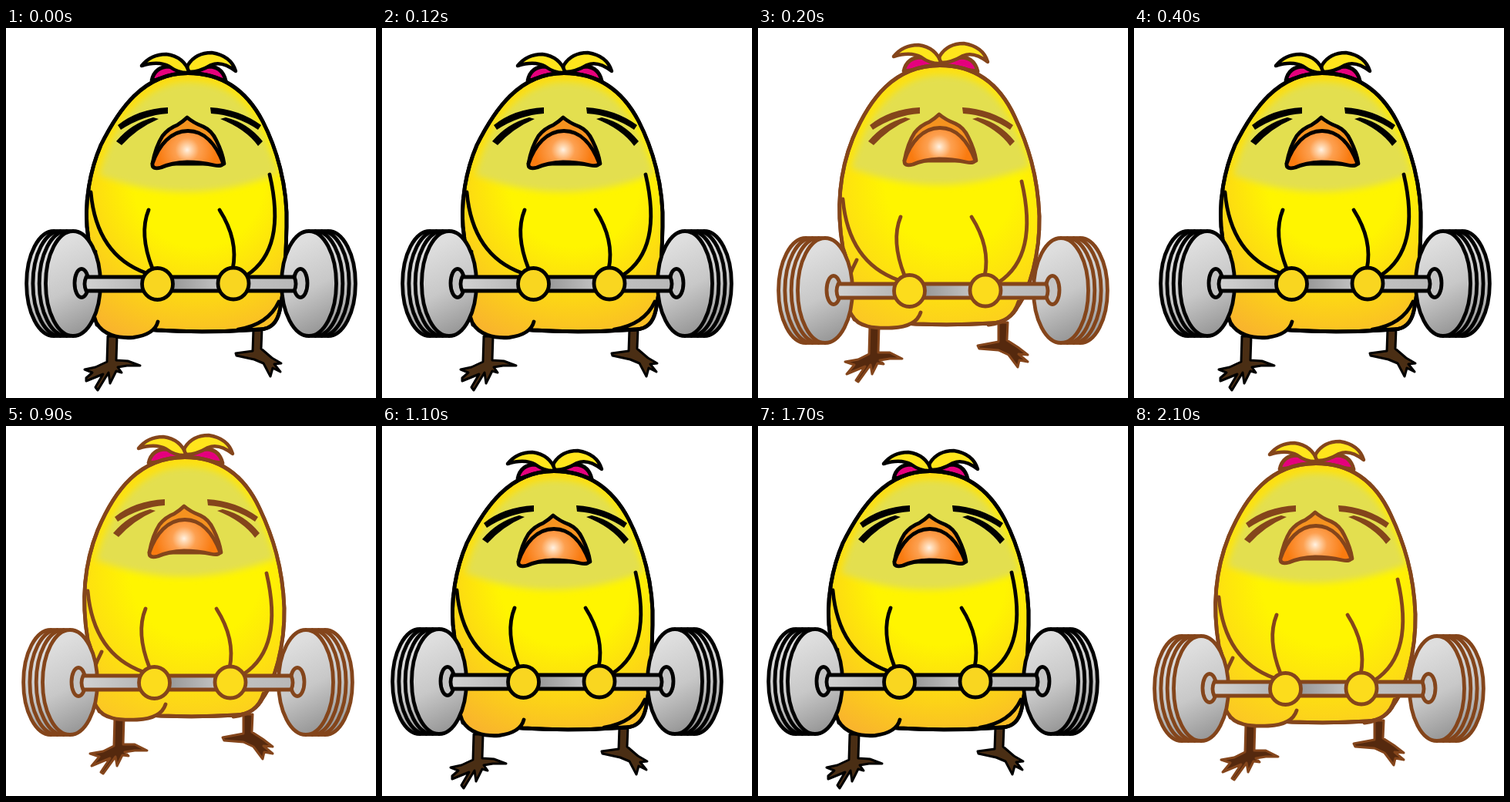
An HTML page for the animation above (2.3 s loop, 480 px wide and 480 px high).

```html
<!DOCTYPE html>
<html lang="en">
<head>
<meta charset="utf-8">
<title>Weightlifting chick</title>
<style>
html, body { margin: 0; width: 100%; height: 100%; overflow: hidden; background: #fff; }
svg { display: block; width: 100%; height: 100%; }
</style>
</head>
<body>
<svg id="stage" viewBox="0 0 480 480" stroke-linecap="round" stroke-linejoin="round"></svg>
<script>
const stage = document.getElementById('stage');

const poses = [
  { // body lowered, bar raised
    id: 'low', ink: '#000', edge: '#f9b52c', hand: '#f9d620', leg: '#4a2e14',
    barY: 0, hairY: 0, beakY: 0, shadeY: 0,
    body: 'M236 58.5C283 58.5 313 83 333 121C350 154 366 204 364 258C363 300 361 340 355 367Q350 390 330 391Q260 396 196 392L118 385Q118 320 107 274C99 226 111 180 123 152C146 106 178 58.5 236 58.5Z',
    lobe: 'M116 290Q106 355 117 382C126 398 145 403 165 401.5C183 399 194 393 197 381',
    thigh: 'M301 391Q340 385 354 355',
    feet: [
      'M132 400L144 400L143 431L158 432L174 438L157 438L145 440L150 447L143 445L135 461L133 447L119 470L116 466L126 449L104 458L104 454L112 447L102 443L116 440L131 433Z',
      'M321 390L332 390L331 416L345 428L357 435L348 436L356 446L346 441L343 452L334 435L322 430L299 425L298 422L320 419Z'
    ]
  },
  { // body stretched upwards, bar sinking
    id: 'high', ink: '#84451b', edge: '#fbc526', hand: '#fcdc1c', leg: '#55290e',
    barY: 9, hairY: -12, beakY: -4, shadeY: -9,
    body: 'M236 48.5C284 48.5 314 74 333 115C350 151 363 191 365 244C366 294 352 340 337 361Q327 381 303 383Q255 386 205 384L125 378Q123 320 110 285C100 226 109 178 123 143C145 91 177 48.5 236 48.5Z',
    lobe: 'M128 301Q104 347 122 373C130 388 151 390 174 389C195 388 207 382 211 369',
    thigh: 'M299 385Q330 382 338 355',
    feet: [
      'M145 386L157 386L156 421L171 421L187 429L171 429L158 431L163 436L155 435L148 449L146 437L130 459L127 457L139 439L115 449L125 437L113 433L130 430L144 423Z',
      'M312 382L324 382L323 405L337 414L350 424L338 423L350 433L339 431L337 440L325 424L312 418L287 416L285 412L312 407Z'
    ]
  }
];

const ellipse = (x, y, rx, ry, fill) =>
  `<ellipse cx="${x}" cy="${y}" rx="${rx}" ry="${ry}" fill="${fill}"/>`;

function weights(front, side) {
  const discs = [3, 2, 1, 0].map(i => ellipse(front + side * i * 8.3, 331.5, 35.5, 68, 'url(#steel)'));
  return discs.join('') + ellipse(front - side * 11, 331, 9, 18.5, '#c4c4c4');
}

function barbell({ barY, hand }) {
  return `<g transform="translate(0 ${barY})">
    ${weights(87, -1)}${weights(393, 1)}
    <path d="M104 323H374Q378 332 374 341H104Q100 332 104 323Z" fill="url(#bar)"/>
    <g fill="none">
      <path d="M110 213C115 268 140 303 182 318M185 236C176 258 179 284 190 312"/>
      <path d="M342 190C356 250 349 297 312 321M277 236C291 258 300 285 294 313"/>
    </g>
    ${ellipse(196.5, 332, 20, 20.5, hand)}${ellipse(295, 331.5, 20, 20.5, hand)}
  </g>`;
}

function hair({ hairY }) {
  return `<g transform="translate(0 ${hairY})">
    <g fill="#e5007d">
      <path d="M189 68Q193 50 212 50Q225 51 235 63Z"/>
      <path d="M238 63Q249 50 266 50Q281 52 285 68Z"/>
    </g>
    <g fill="#ffe51c" stroke-width="4.5">
      <path d="M176 49Q188 34 208 34Q231 37 238 58Q224 59 212 50Q198 42 176 49Z"/>
      <path d="M236 48Q246 32 267 32Q292 36 298 56Q280 42 266 48Q251 57 238 57Q234 52 236 48Z"/>
    </g>
  </g>`;
}

function face({ ink, beakY }) {
  return `<g fill="${ink}" stroke="none">
      <path d="M145 126Q171 105 210 103L210 111Q178 113 149 132Z"/>
      <path d="M143 147Q162 124 191 116L198 118Q170 130 150 152Z"/>
      <path d="M265 103L266 111Q299 113 327 132L331 126Q302 105 265 103Z"/>
      <path d="M278 118Q311 131 327 153L333 147Q314 123 285 116Z"/>
    </g>
    <g transform="translate(0 ${beakY})">
      <path d="M190 176Q194 154 203 140Q211 130 222 126Q230 121 235 116Q243 123 256 128Q267 133 273 146Q281 162 283 176Z" fill="#f5921f"/>
      <path d="M190 176C198 152 214 133.5 236 133.5C258 133.5 273 152 282 176Q279 180 270 178Q252 174 235 174Q214 175 201 181Q189 184 190 176Z" fill="url(#mouth)"/>
    </g>`;
}

function chick(pose) {
  const { id, ink, edge, leg, body, lobe, thigh, feet, shadeY } = pose;
  return `<g id="${id}" stroke="${ink}" stroke-width="4.8">
    <radialGradient id="skin-${id}" gradientUnits="userSpaceOnUse" cx="250" cy="200" r="222">
      <stop offset=".38" stop-color="#fff500"/><stop offset="1" stop-color="${edge}"/>
    </radialGradient>
    <clipPath id="clip-${id}"><path d="${body}"/></clipPath>
    <path d="${feet.join('')}" fill="${leg}" stroke-width="3"/>
    ${hair(pose)}
    <path d="${body}" fill="url(#skin-${id})"/>
    <g clip-path="url(#clip-${id})">
      <path d="M236 70C186 70 152 114 137 146Q126 170 121 191Q236 235 353 189Q345 160 325 123C304 87 280 70 236 70Z"
        transform="translate(0 ${shadeY})" fill="#e3df50" stroke="none" filter="url(#soft)"/>
    </g>
    <path d="${body}${thigh}" fill="none"/>
    <path d="${lobe}L190 350L125 300Z" fill="url(#skin-${id})" stroke="none"/>
    <path d="${lobe}" fill="none"/>
    ${face(pose)}${barbell(pose)}
  </g>`;
}

stage.innerHTML = `<defs>
  <linearGradient id="steel" x1=".35" y1="0" x2=".6" y2="1">
    <stop offset=".1" stop-color="#dedede"/><stop offset=".55" stop-color="#c8c8c8"/><stop offset="1" stop-color="#959595"/>
  </linearGradient>
  <linearGradient id="bar">
    <stop offset="0" stop-color="#d2d2d2"/><stop offset=".3" stop-color="#b5b5b5"/>
    <stop offset=".42" stop-color="#999"/><stop offset=".65" stop-color="#c4c4c4"/><stop offset="1" stop-color="#b8b8b8"/>
  </linearGradient>
  <radialGradient id="mouth" gradientUnits="userSpaceOnUse" cx="235" cy="158" r="44">
    <stop offset="0" stop-color="#fff2e4"/><stop offset=".1" stop-color="#ffdab5"/>
    <stop offset=".35" stop-color="#fda050"/><stop offset=".85" stop-color="#f97b10"/>
  </radialGradient>
  <filter id="soft"><feGaussianBlur stdDeviation="4"/></filter>
</defs>` + poses.map(chick).join('');

// Each step: end time in ms, pose, horizontal and vertical shift.
const steps = [
  [200, 'low', 0, 0], [400, 'high', 0, 0], [900, 'low', 8, 0],
  [1100, 'high', -4, -8], [2100, 'low', -13, 0], [2300, 'high', 0, 0]
];

function draw() {
  const time = performance.now() % 2300;
  const [, active, x, y] = steps.find(([end]) => time < end);
  for (const { id } of poses) {
    const group = document.getElementById(id);
    group.setAttribute('display', id === active ? 'inline' : 'none');
    group.setAttribute('transform', `translate(${x} ${y})`);
  }
  requestAnimationFrame(draw);
}
draw();
</script>
</body>
</html>
```
